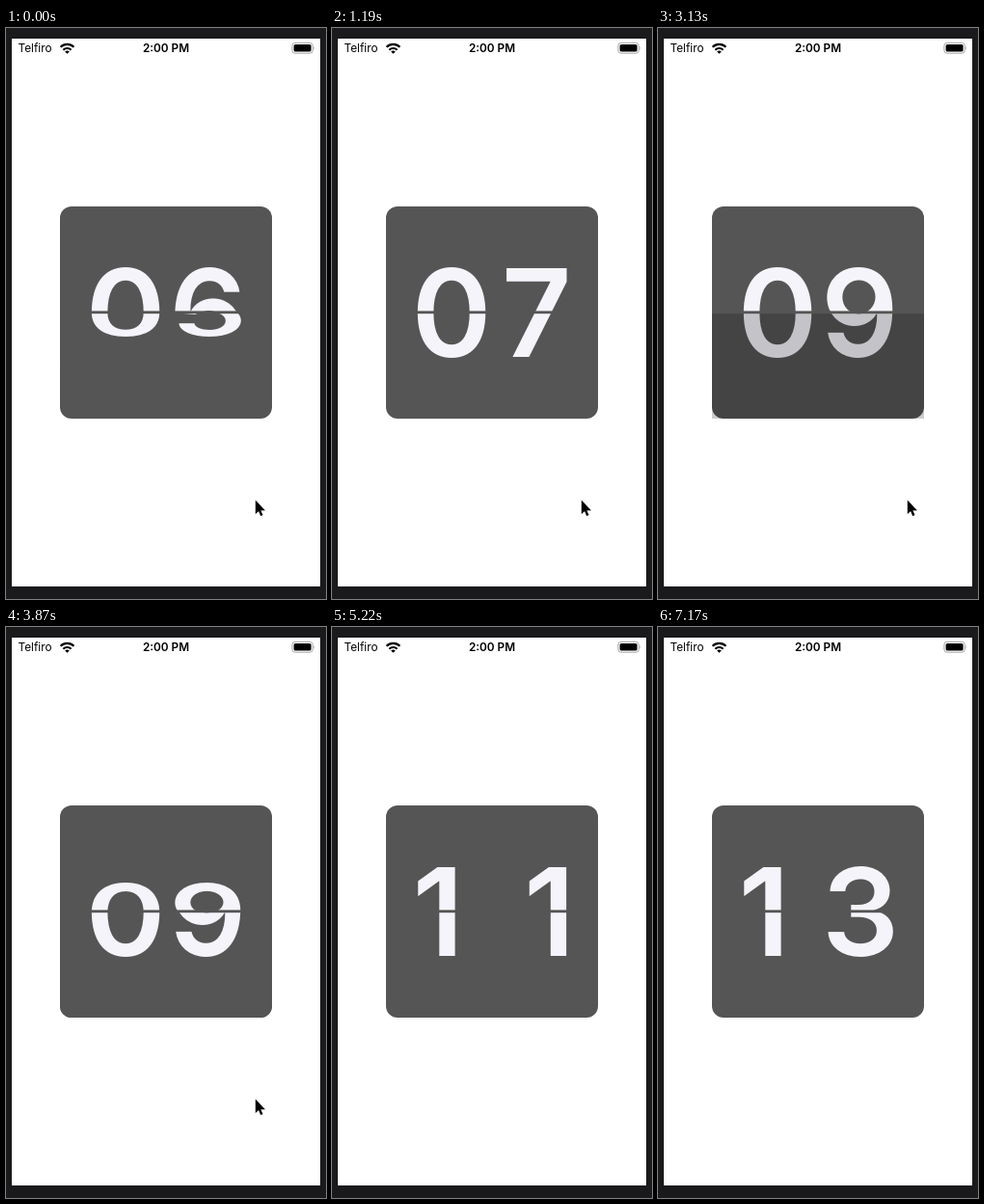
Animation, 332 px wide and 592 px high, one loop 7.32 s. Source, as an HTML page:

```html
<!DOCTYPE html>
<html lang="en">
<head>
<meta charset="utf-8">
<title>Flip counter</title>
<style>
  html, body { margin: 0; width: 100%; height: 100%; overflow: hidden; background: #1a1a1c; }
  svg { display: block; width: 332px; height: 592px; }
  text { font-family: Inter, "Liberation Sans", sans-serif; font-optical-sizing: none; }
  .half text { font-size: 126px; font-weight: 600; fill: #f4f4fa; }
  .half rect, .seam { fill: #555; }
  .status { font-size: 11.8px; fill: #000; }
  .time { font-weight: 600; text-anchor: middle; }
</style>
</head>
<body>
<svg viewBox="0 0 332 592">
  <defs>
    <clipPath id="upper"><rect x="56" y="185" width="220" height="110"/></clipPath>
    <clipPath id="lower"><rect x="56" y="295" width="220" height="110"/></clipPath>
  </defs>
  <rect width="332" height="592" fill="#1a1a1c"/>
  <rect x="6" y="11" width="320" height="568" fill="#fff"/>

  <g class="status">
    <text x="12.5" y="25">Telfiro</text>
    <text class="time" x="166" y="25">2:00 PM</text>
  </g>
  <g fill="none" stroke="#000" stroke-width="2.2">
    <path d="M56.6 19.8A9.8 9.8 0 0 1 70.4 19.8"/>
    <path d="M59.4 22.7A5.8 5.8 0 0 1 67.6 22.7"/>
    <path d="M61.2 24.5A3.3 3.3 0 0 1 65.8 24.5L63.5 26.8Z" fill="#000" stroke="none"/>
  </g>
  <rect x="296.9" y="15.4" width="21.4" height="10.8" rx="3" fill="#fff" stroke="#a3a8a3"/>
  <rect x="298.6" y="17" width="18" height="7.6" rx="1.6"/>
  <path d="M319.5 19Q321.2 20.8 319.5 22.6Z" fill="#a3a8a3"/>

  <g id="card"></g>
  <rect id="shade" x="56" y="296" width="220" height="109" clip-path="url(#lower)" opacity="0"/>
  <rect class="seam" x="56" y="293.4" width="220" height="2.8"/>

  <path id="cursor" d="M0 0V14.6L3.3 11.5 5.4 16.5 7.7 15.5 5.6 10.7H10.2Z"
        stroke="#fff" stroke-width="1.6" stroke-linejoin="round" paint-order="stroke"/>
</svg>
<script>
  const LOOP = 7320, STEP = 150, BEAT = 995, FIRST_BEAT = -175;
  const FALL = 120, LIFT = 85;   // upper flap, then lower flap, in ms
  const AXIS = 295, LEFT = 88.5, RIGHT = 244;

  // Visible start and end of each flip; the first one leads to 06
  const flips = [[0, 300], [900, 1190], [1940, 2240], [2830, 3280],
                 [3870, 4170], [4920, 5220], [5820, 6120], [6870, 7170]];

  const $ = id => document.getElementById(id);
  const shade = $('shade'), cursor = $('cursor');

  function make(tag, attrs, parent) {
    const el = document.createElementNS('http://www.w3.org/2000/svg', tag);
    for (const key in attrs) el.setAttribute(key, attrs[key]);
    return parent.appendChild(el);
  }

  const pen = document.createElement('canvas').getContext('2d');
  pen.font = '600 126px Inter, "Liberation Sans", sans-serif';

  function makeHalf(side) {
    const flap = make('g', { class: 'half' }, $('card'));
    const face = make('g', { 'clip-path': `url(#${side})` }, flap);
    make('rect', { x: 56, y: 185, width: 220, height: 220, rx: 12 }, face);
    const tens = make('text', { y: 341.4 }, face);
    const ones = make('text', { y: 341.4 }, face);
    return { flap, tens, ones, value: -1 };
  }

  // The ink of the tens starts at LEFT, the ink of the ones ends at RIGHT
  function setValue(half, value) {
    if (half.value === value) return;
    half.value = value;
    const [a, b] = String(value).padStart(2, '0');
    half.tens.textContent = a;
    half.ones.textContent = b;
    half.tens.setAttribute('x', LEFT + pen.measureText(a).actualBoundingBoxLeft);
    half.ones.setAttribute('x', RIGHT - pen.measureText(b).actualBoundingBoxRight);
  }

  // turn: 0 lies flat, 1 stands edge-on
  function setTurn(half, turn) {
    const t = Math.min(1, Math.max(0, turn));
    const scale = Math.cos(t * Math.PI / 2);
    half.flap.setAttribute('visibility', t < 1 ? 'visible' : 'hidden');
    half.flap.setAttribute('transform', `translate(0 ${AXIS * (1 - scale)}) scale(1 ${scale})`);
  }

  const newTop = makeHalf('upper'), oldTop = makeHalf('upper');
  const newBottom = makeHalf('lower'), oldBottom = makeHalf('lower');

  function drawCard(t) {
    const i = flips.findLastIndex(([start]) => t >= start);
    const [start, end] = flips[i];
    const tick = start + STEP * Math.floor((t - start) / STEP);
    const age = t < end ? tick - (FIRST_BEAT + BEAT * i) : Infinity;
    for (const half of [newTop, newBottom]) setValue(half, 6 + i);
    for (const half of [oldTop, oldBottom]) setValue(half, 5 + i);
    setTurn(oldTop, age / FALL);
    setTurn(oldBottom, (age - FALL) / LIFT);
    shade.setAttribute('opacity', t < end && age > FALL + LIFT ? 0.2 : 0);
  }

  function drawCursor(t) {
    const [x, y] = t < 4170 ? [258.8, 489.5] : t < 4320 ? [275, 515] : [309, 570];
    cursor.setAttribute('transform', `translate(${x} ${y})`);
    cursor.setAttribute('visibility', t < 4470 ? 'visible' : 'hidden');
  }

  const begin = performance.now();
  function draw() {
    const t = (performance.now() - begin) % LOOP;
    drawCard(t);
    drawCursor(t);
    requestAnimationFrame(draw);
  }
  draw();
</script>
</body>
</html>
```
